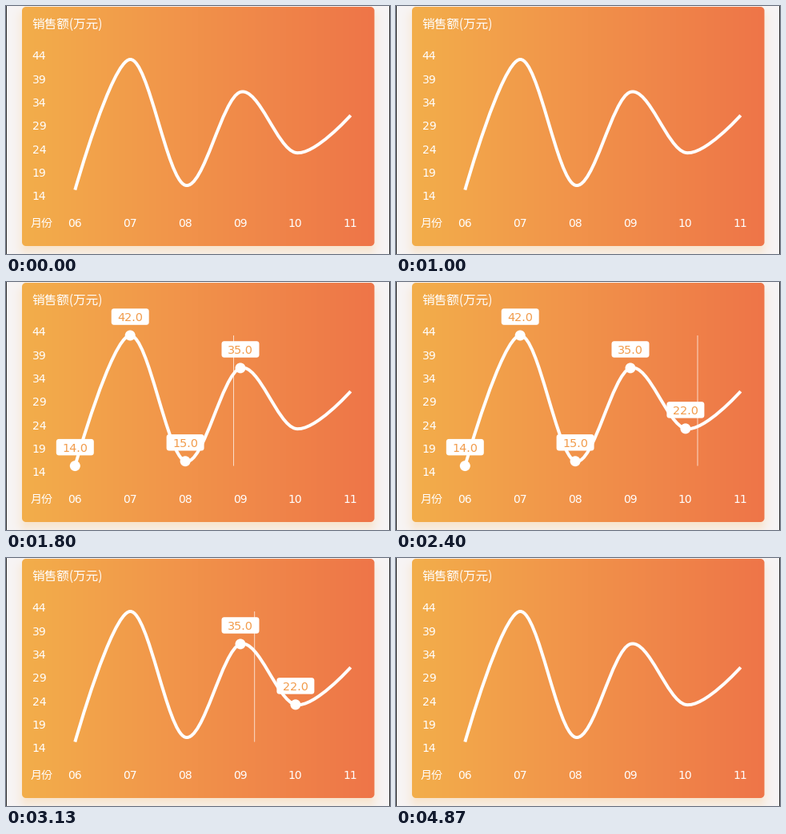
A matplotlib script that plays this animation: 480x311 px, repeating every 4.94 s.

```python
import numpy as np
import matplotlib.pyplot as plt
from matplotlib.animation import FuncAnimation
from matplotlib.patches import Circle, FancyBboxPatch, PathPatch
from matplotlib.path import Path

W, H, DPI = 480, 311, 100
LOOP_MS, STEP_MS, CAPTURE_FPS = 4940, 20, 15
PX = 72 / DPI

MONTHS = ["06", "07", "08", "09", "10", "11"]
SALES = [14, 42, 15, 35, 22, 30]
TOP, BOTTOM = 67, 230.6
POINTS = np.array([(86.3 + 68.9 * i, BOTTOM - (v - 14) * (BOTTOM - TOP) / 28)
                   for i, v in enumerate(SALES)])

# Finger position while dragging: time in ms, x in px
DRAG_T = np.array([1060, 1330, 1800, 2100, 2400, 2600, 3130, 3260])
DRAG_X = np.array([86, 136.5, 284.5, 340, 377, 380, 311, 299])
DRAG_V = np.gradient(DRAG_X, DRAG_T)
BUBBLE_MS = 1500


def drag_x(t):
    """Cubic Hermite interpolation of the finger position."""
    i = int(np.clip(np.searchsorted(DRAG_T, t, "right") - 1, 0, len(DRAG_T) - 2))
    h = DRAG_T[i + 1] - DRAG_T[i]
    u = (t - DRAG_T[i]) / h
    return ((1 + 2 * u) * (1 - u) ** 2 * DRAG_X[i] + u * (1 - u) ** 2 * h * DRAG_V[i]
            + u * u * (3 - 2 * u) * DRAG_X[i + 1] + u * u * (u - 1) * h * DRAG_V[i + 1])


def first_touches():
    """Time at which each point first becomes the nearest one to the finger."""
    touched = {}
    for t in range(DRAG_T[0], DRAG_T[-1], 5):
        nearest = int(np.argmin(abs(POINTS[:, 0] - drag_x(t))))
        touched.setdefault(nearest, t)
    return touched


def box_distance(x, y, x0, y0, x1, y1, r):
    """Signed distance to a rounded rectangle."""
    dx = abs(x - (x0 + x1) / 2) - (x1 - x0) / 2 + r
    dy = abs(y - (y0 + y1) / 2) - (y1 - y0) / 2 + r
    outside = np.hypot(np.maximum(dx, 0), np.maximum(dy, 0))
    return outside + np.minimum(np.maximum(dx, dy), 0) - r


def backdrop():
    x, y = np.meshgrid(np.arange(W) + 0.5, np.arange(H) + 0.5)
    page = np.array([247, 245, 246.0])
    glow = np.array([247, 178, 84.0])
    shade = 0.28 / (1 + np.exp(box_distance(x, y, 20, 9, 460, 309, 8) / 4.5))
    img = page + shade[..., None] * (glow - page)

    stops = [(243, 174, 74), (241, 145, 74), (238, 117, 72)]
    card = np.stack([np.interp(x, [20, 240, 460], c) for c in zip(*stops)], -1)
    cover = np.clip(0.5 - box_distance(x, y, 20, 1, 460.5, 301, 5), 0, 1)[..., None]
    img = img + cover * (card - img)
    img[:, [0, -1]] = 50
    return img / 255


def cardinal_path(p):
    """Cardinal spline whose end points have no handles."""
    tangent = np.zeros_like(p)
    tangent[1:-1] = (p[2:] - p[:-2]) / 6
    verts = [p[0]]
    for i in range(len(p) - 1):
        verts += [p[i] + tangent[i], p[i + 1] - tangent[i + 1], p[i + 1]]
    return Path(verts, [Path.MOVETO] + [Path.CURVE4] * (len(verts) - 1))


fig = plt.figure(figsize=(W / DPI, H / DPI), dpi=DPI)
ax = fig.add_axes([0, 0, 1, 1])
ax.imshow(backdrop(), extent=(0, W, H, 0), interpolation="nearest", aspect="auto")
ax.set(xlim=(0, W), ylim=(H, 0))
ax.axis("off")


def label(x, y, s, size=14, ha="left", color="white", font="DejaVu Sans", z=3):
    return ax.text(x, y, s, size=size * PX, ha=ha, va="baseline", color=color,
                   family=font, zorder=z)


label(32.5, 28, "销售额(万元)", 15.6, font="Noto Sans CJK JP")
label(31, 276.6, "月份", 14, font="Noto Sans CJK JP")
for i in range(7):
    label(32.5, 67.3 + 29.33 * i, str(44 - 5 * i))
for (x, _), month in zip(POINTS, MONTHS):
    label(x - 0.3, 276.8, month, ha="center")

ax.add_patch(PathPatch(cardinal_path(POINTS), fc="none", ec="white", lw=4 * PX,
                       capstyle="butt", zorder=4))
cursor, = ax.plot([0, 0], [TOP, BOTTOM], color="white", alpha=0.7, lw=PX,
                  solid_capstyle="butt", snap=False, zorder=3)


def make_bubble(x, y, value):
    dot = Circle((x, y), 6.5, fc="white", ec="none", zorder=5)
    box = FancyBboxPatch((x - 23.5, y - 33.7), 47, 20.5, fc="white", ec="none",
                         boxstyle="round,pad=0,rounding_size=3.5", zorder=6)
    ax.add_patch(dot)
    ax.add_patch(box)
    text = label(x, y - 18, f"{value:.1f}", 14.4, ha="center", color="#f29b4a", z=7)
    return dot, box, text


shown_at = first_touches()
bubbles = {i: make_bubble(*POINTS[i], SALES[i]) for i in shown_at}


def update(frame):
    # The motion advances in 1/15 s steps
    tick = int((frame * STEP_MS + 15) * CAPTURE_FPS / 1000)
    t = tick * 1000 / CAPTURE_FPS
    cursor.set_visible(bool(DRAG_T[0] <= t < DRAG_T[-1]))
    if cursor.get_visible():
        cursor.set_xdata([drag_x(t)] * 2)
    for i, parts in bubbles.items():
        for part in parts:
            part.set_visible(shown_at[i] <= t < shown_at[i] + BUBBLE_MS)
    return [cursor, *(part for parts in bubbles.values() for part in parts)]


anim = FuncAnimation(fig, update, frames=LOOP_MS // STEP_MS, interval=STEP_MS,
                     repeat=True, repeat_delay=0, blit=False)
plt.show()
```
